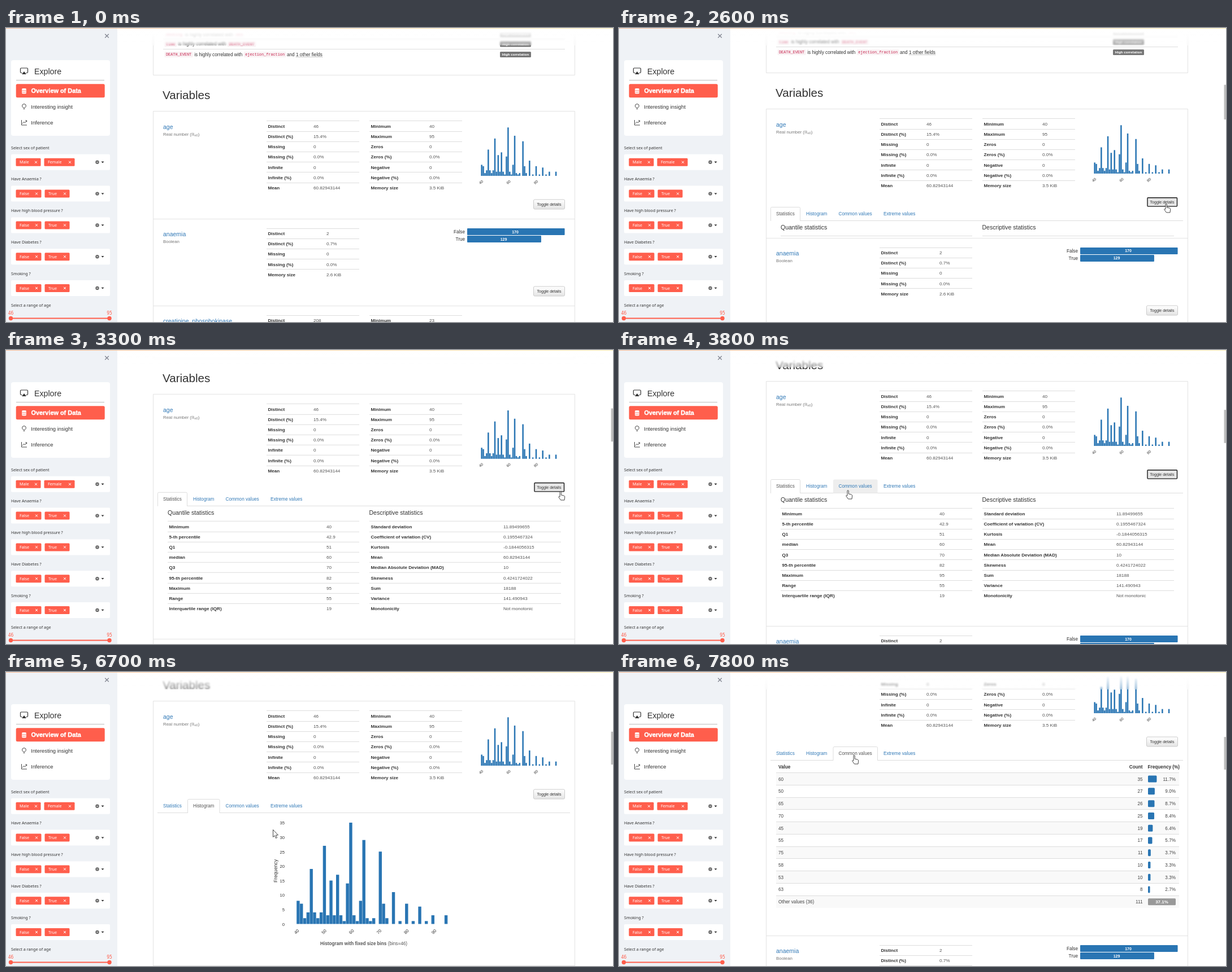
An HTML page that plays this animation: 1074 by 521 pixels, repeating every 8 s.

```html
<!DOCTYPE html>
<html lang="en">
<head>
<meta charset="utf-8">
<title>Data overview</title>
<style>
html, body { margin: 0; width: 100%; height: 100%; overflow: hidden; background: #fff; }
svg { position: absolute; left: 0; top: 0; font-family: "Liberation Sans", Arial, sans-serif; }
#header { position: absolute; left: 197px; top: 0; width: 877px; height: 31px;
  background: linear-gradient(#fff 20%, rgba(255,255,255,.5) 75%, rgba(255,255,255,.25));
  backdrop-filter: blur(1.6px); }
#stripe { position: absolute; left: 0; top: 0; width: 1074px; height: 1px;
  background: linear-gradient(90deg, #fbc09a, #fbeeb0); }
</style>
</head>
<body>
<svg id="main" width="1074" height="521"></svg>
<div id="header"></div>
<svg id="side" width="197" height="521"></svg>
<div id="stripe"></div>
<script>
const BLUE = '#2975b3', LINK = '#337ab7', RED = '#ff5e4c', INK = '#333', GRAY = '#777', EDGE = '#e3e3e3';
const SANS = 'font-family="Noto Sans, sans-serif"', MONO = 'font-family="Liberation Mono, monospace"';
const BOLD = 'font-weight="bold"', END = 'text-anchor="end"', MID = 'text-anchor="middle"';
const BOLD_END = `${BOLD} ${END}`, BOLD_MID = `${BOLD} ${MID}`;
const LOOP = 8000, STEP = 100, VIEW = 521;

// y is the vertical middle of the text
const text = (x, y, s, size = 8.2, fill = INK, more = '') =>
  `<text x="${x}" y="${y + size * .36}" font-size="${size}" fill="${fill}" ${more}>${s}</text>`;
const rect = (x, y, w, h, fill, more = '') =>
  `<rect x="${x}" y="${y}" width="${w}" height="${h}" fill="${fill}" ${more}/>`;
const path = (d, stroke, width = 1, fill = 'none', more = '') =>
  `<path d="${d}" stroke="${stroke}" stroke-width="${width}" fill="${fill}" ${more}/>`;
const hline = (x1, x2, y, color = '#ddd') => path(`M${x1} ${Math.floor(y) + .5}H${x2}`, color);
const group = (x, y, body, more = '') => `<g transform="translate(${x} ${y})" ${more}>${body}</g>`;
const tilted = (x, y, s, size, angle) =>
  text(x, y, s, size, INK, `${MID} transform="rotate(${angle} ${x} ${y})"`);
const list = (n, f) => Array.from({ length: n }, (_, i) => f(i)).join('');

// Smooth 0 to 1 between two times
function ramp(t, from, to) {
  const p = Math.min(1, Math.max(0, (t - from) / (to - from)));
  return p * p * (3 - 2 * p);
}

// Clicks that open the details and then each further tab
const CLICKS = [2600, 5700, 7600];
const PANEL = [243, 278, 318];

// Cursor moves: start, end, x, y
const MOVES = [[300, 1200, 934, 122], [1200, 1400, 963, 250], [1400, 2000, 964, 311],
  [2600, 3100, 977, 250], [3300, 3800, 401, 248], [3900, 4000, 350, 246], [4300, 4500, 342, 255],
  [4700, 5100, 334, 248], [6300, 6500, 412, 243], [6600, 6700, 472, 279], [6900, 7300, 412, 147]];
const cursorAt = t => MOVES.reduce(([x, y], [from, to, tx, ty]) => {
  const p = ramp(t, from, to);
  return [x + (tx - x) * p, y + (ty - y) * p];
}, [968, 114]);

// Round ages dominate; the ages between them thin out
const BINS = 46;
const PEAKS = { 40: 8, 42: 7, 45: 19, 50: 27, 53: 15, 55: 17, 58: 14, 60: 35, 63: 8, 65: 29,
  70: 25, 72: 7, 75: 11, 80: 7, 85: 6, 90: 3, 95: 3 };
const counts = Array.from({ length: BINS }, (_, i) =>
  Math.max(0, Math.round(3.4 - i * .09 + (i % 2 ? .8 : -.8))));
for (const age in PEAKS)
  counts[Math.min(BINS - 1, Math.floor((age - 40) / 55 * BINS))] = PEAKS[age];
const bars = (x, base, w, unit) =>
  list(BINS, i => rect(x + i * w, base - counts[i] * unit, w - .4, counts[i] * unit, BLUE));

function table(x, x2, y, valueX, rows) {
  return rows.split('|').map((r, i) => {
    const [label, value] = r.split(':'), cy = y + i * 18.22;
    return hline(x, x2, cy - 9) + text(x + 2.5, cy, label, 8.1, INK, BOLD) +
      text(valueX, cy, value, 8.1, '#555');
  }).join('');
}

const code = (x, y, s) => rect(x - 2.5, y - 5, s.length * 4.11 + 5, 10, '#f9f2f4', 'rx="1.5"') +
  text(x, y, s, 6.85, '#c7254e', MONO);

function alertRow(y, a, b) {
  const x = 288 + a.length * 4.11;
  return hline(278, 989, y - 9.5) + code(283, y, a) + text(x, y, 'is highly correlated with') +
    code(x + 90, y, b) + rect(874, y - 5, 55, 10, GRAY, 'rx="1.5"') +
    text(901.5, y, 'High correlation', 6.2, '#fff', BOLD_MID);
}

function button(y, focused, pressed) {
  const box = focused
    ? rect(935, y - 7.8, 52.5, 15.4, pressed ? '#d6d6d6' : '#e6e6e6', 'stroke="#1a1a1a" stroke-width="1.4" rx="1"')
    : rect(933.5, y - 8.5, 55, 17, 'url(#btn)', 'stroke="#ccc" rx="2"');
  return box + text(961, y, 'Toggle details', 7, INK, MID);
}

const ALERTS = path('M260.5 -20V83.5H1006.5V-20', EDGE) +
  alertRow(11, 'smoking', 'sex') + alertRow(28.5, 'time', 'DEATH_EVENT') +
  alertRow(47, 'DEATH_EVENT', 'ejection_fraction') + text(497, 47, 'and') +
  text(513, 47, '1 other fields') + path('M513 51.5H560', GRAY, .8, 'none', 'stroke-dasharray="1 1"');

const AGE = text(277, 118.5, 'Variables', 20.6) +
  path('M260.5 1000V147.5H1006.5V1000', EDGE) + text(278, 175.2, 'age', 10.5, LINK) +
  text(278, 188, 'Real number (<tspan font-family="DejaVu Sans, sans-serif" font-size="7">ℝ</tspan>' +
    '<tspan font-size="5.5" dy="1.5">≥0</tspan><tspan dy="-1.5">)</tspan>', 7.9, GRAY) +
  table(461, 625, 173.8, 544, 'Distinct:46|Distinct (%):15.4%|Missing:0|Missing (%):0.0%|Infinite:0|Infinite (%):0.0%|Mean:60.82943144') +
  table(643, 807, 173.8, 749, 'Minimum:40|Maximum:95|Zeros:0|Zeros (%):0.0%|Negative:0|Negative (%):0.0%|Memory size:3.5 KiB') +
  bars(840.4, 262, 2.92, 2.45) +
  list(3, i => tilted(840.5 + i * 48.5, 273, 40 + i * 20, 6.5, -45));

const boolBar = (y, label, n) => text(812, y, label, 8.2, INK, END) +
  rect(816, y - 6, n * 1.015, 12, BLUE, 'rx="1"') + text(816 + n / 2, y, n, 7, '#fff', BOLD_MID);

const LOWER = rect(261, 338, 745, 700, '#fff') + hline(260, 1007, 338, EDGE) +
  text(278, 365.5, 'anaemia', 10.5, LINK) + text(278, 378.5, 'Boolean', 7.9, GRAY) +
  table(461, 625, 364, 567, 'Distinct:2|Distinct (%):0.7%|Missing:0|Missing (%):0.0%|Memory size:2.6 KiB') +
  boolBar(361, 'False', 170) + boolBar(374, 'True', 129) +
  button(466.5) + hline(260, 1007, 492, EDGE) +
  text(278, 519.5, 'creatinine_phosphokinase', 10.5, LINK) +
  table(461, 625, 518, 544, 'Distinct:208|Distinct (%):69.6%') +
  table(643, 807, 518, 749, 'Minimum:23|Maximum:7861');

const STATS = text(286, 357, 'Quantile statistics', 10.5) + text(642.5, 357, 'Descriptive statistics', 10.5) +
  table(286, 625, 381.8, 567, 'Minimum:40|5-th percentile:42.9|Q1:51|median:60|Q3:70|95-th percentile:82|Maximum:95|Range:55|Interquartile range (IQR):19') +
  table(643, 982, 381.8, 880, 'Standard deviation:11.89499655|Coefficient of variation (CV):0.1955467324|Kurtosis:-0.1844056315|Mean:60.82943144|Median Absolute Deviation (MAD):10|Skewness:0.4241724022|Sum:18188|Variance:141.490943|Monotonicity:Not monotonic');

const HISTOGRAM = bars(514.2, 542.5, 5.815, 5.13) +
  list(8, i => text(493, 543 - i * 25.65, i * 5, 7.7, INK, END)) +
  list(6, i => tilted(514 + i * 48.6, 556, 40 + i * 10, 7.7, -45)) +
  tilted(476.5, 448.5, 'Frequency', 8.7, -90) +
  text(556, 577, 'Histogram with fixed size bins <tspan font-weight="normal">(bins=46)</tspan>', 8.2, '#555', BOLD);

function valueRow(row, i) {
  const [value, count] = row.split(':'), y = 378.6 + i * 21.77, pct = count / 2.99;
  const label = pct.toFixed(1) + '%', other = value.startsWith('Other');
  return (i % 2 ? '' : rect(278, y - 11, 713, 21.8, '#f9f9f9')) + hline(278, 991, y - 11) +
    text(282, y, value, 8.2, '#444') + text(926.5, y, count, 8.2, '#444', END) +
    rect(936, y - 6, pct * 1.32, 12, other ? '#999' : BLUE, 'rx="1.5"') +
    (other ? text(960.5, y, label, 8, '#fff', BOLD_MID) : text(985, y, label, 8.2, '#444', END));
}

const COMMON = text(282, 357, 'Value', 8.2, INK, BOLD) + text(926.5, 357, 'Count', 8.2, INK, BOLD_END) +
  text(992, 357, 'Frequency (%)', 8.2, INK, BOLD_END) +
  '60:35|50:27|65:26|70:25|45:19|55:17|75:11|58:10|53:10|63:8|Other values (36):111'
    .split('|').map(valueRow).join('');

const CONTENT = [STATS, HISTOGRAM, COMMON];
const TABS = ['Statistics', 'Histogram', 'Common values', 'Extreme values'];
const TAB_X = [268.5, 321.5, 379, 458.5, 535];

function tabBar(active, hover) {
  return hline(268, 998, 345) + TABS.map((name, i) => {
    const a = TAB_X[i], b = TAB_X[i + 1] - 1;
    const shape = `M${a} 345.5V323.5q0-2 2-2H${b - 2}q2 0 2 2V345.5`;
    const back = i === active ? path(shape, '#ddd', 1, '#fff') + rect(a + .5, 345, b - a - 1, 1.2, '#fff')
      : i === hover ? path(shape, 'none', 0, '#eee') : '';
    return back + text(a + 9.5, 333.4, name, 8.2, i === active ? '#555' : LINK);
  }).join('');
}

const HAND = 'M3 1.2q1.3-1 2.3.2V7l5 1.2q1.5.6 1.4 2L11 16H4.5L.6 10.4q.4-1.6 2.4-.2z';
const ARROW = 'M.5 .5V13.5L3.4 10.9 5.4 15.6 7.6 14.6 5.5 10H9.5z';
const DEFS = '<defs><linearGradient id="btn" x2="0" y2="1"><stop stop-color="#fff"/>' +
  '<stop offset="1" stop-color="#e4e4e4"/></linearGradient></defs>';

function render(t) {
  const clicks = CLICKS.filter(c => t >= c).length, active = Math.max(0, clicks - 1);
  const open = PANEL[active] * ramp(t, 2500, 2900);
  const scroll = 4 * clicks + 88 * ramp(t, 3100, 3400) + 89 * ramp(t, 6900, 7300);
  const [x, y] = cursorAt(t), tipX = x + 4, tipY = y + scroll;
  const onTabs = clicks && tipY > 321 && tipY < 345.5;
  const hover = onTabs ? TABS.findIndex((_, i) => tipX > TAB_X[i] && tipX < TAB_X[i + 1]) : -1;
  const onButton = tipX > 933 && tipX < 989 && tipY > 303 && tipY < 321;
  const fade = active && t === CLICKS[active] ? .5 : 1;
  const details = open ? tabBar(active, hover) + group(0, 0, CONTENT[active], `opacity="${fade}"`) : '';
  const page = ALERTS + AGE + button(312.5, t >= 200 && t < 5000, t >= 2400 && t < 2600) +
    details + group(0, open, LOWER);
  const ratio = VIEW / (4378 + open);
  const overlay = rect(1070.5, (849 + scroll) * ratio, 3.5, VIEW * ratio, '#bdbdbd') +
    group(x, y, path(hover >= 0 || onButton ? HAND : ARROW, INK, .9, '#fff'));
  main.innerHTML = DEFS + group(0, -scroll, page) + (t < 200 ? '' : overlay);
}

function sidebar() {
  const cross = (x, y, r, color, w) =>
    path(`M${x - r} ${y - r}l${2 * r} ${2 * r}m0 ${-2 * r}l${-2 * r} ${2 * r}`, color, w);
  const tag = (x, w, y, s) => rect(x, y - 7, w, 14, RED, 'rx="1.5"') +
    text(x + 6.5, y, s, 7.2, '#fff', SANS) + cross(x + w - 8.5, y, 2, '#fff', 1);
  const tags = (y, a, wa, b, wb) => tag(17.5, wa, y, a) + tag(23.5 + wa, wb, y, b);
  const field = (s, i) => {
    const y = 212 + i * 55.8, by = y + 25.8;
    return text(9, y, s, 7.2, INK, SANS) + rect(9, by - 14, 175, 28, '#fff', 'rx="2"') +
      (i ? tags(by, 'False', 45, 'True', 44) : tags(by, 'Male', 44, 'Female', 54)) +
      `<circle cx="161.5" cy="${by}" r="3.2" fill="#666"/>` + cross(161.5, by, 1.1, '#fff', .8) +
      path(`M168.5 ${by - 1.2}h5l-2.5 2.8z`, 'none', 0, INK);
  };
  const fields = ['Select sex of patient', 'Have Anaemia ?', 'Have high blood pressure ?',
    'Have Diabetes ?', 'Smoking ?'].map(field).join('');
  const menu = rect(9, 57, 175, 134, '#fff', 'rx="4"') +
    path('M28.5 79.5H27q-1.5 0-1.5-1.5V72.5q0-1.5 1.5-1.5H37q1.5 0 1.5 1.5V78q0 1.5-1.5 1.5H35.5', INK, 1.2) +
    path('M32 77l4 5h-8z', 'none', 0, INK) +
    text(50, 76.5, 'Explore', 14.2) + hline(18, 174, 92, '#bbb') +
    rect(17.7, 99.3, 157, 24, RED, 'rx="2.5"') + rect(28, 107, 8, 9.5, '#fff', 'rx="2"') +
    path('M28 110.2q4 1.6 8 0M28 113.3q4 1.6 8 0', RED, .8) +
    text(44.5, 111.3, 'Overview of Data', 10.9, '#fff', `${BOLD} stroke="#fff" stroke-width=".4"`) +
    path('M30.6 141.5Q28.5 139.5 28.6 138a3.4 3.4 0 0 1 6.8 0Q35.5 139.5 33.4 141.5zM30.7 143.5h2.6', INK, .9) +
    text(44.3, 139.3, 'Interesting insight', 9.4) +
    path('M27.5 163V172H37M29 169.5l2.5-3 2 1.5 3-3.7M34.3 164h2.4v2.4', INK, .9) +
    text(44.3, 167.3, 'Inference', 9.4);
  const thumb = (x, value) => `<circle cx="${x}" cy="514.5" r="3.7" fill="${RED}"/>` +
    text(x, 505, value, 8, RED, `${MID} font-family="DejaVu Sans Mono, monospace"`);
  return rect(0, 0, 197, VIEW, '#eff2f6') + cross(178.5, 14, 3.3, '#808490', 1.3) + menu + fields +
    text(9, 491, 'Select a range of age', 7.2, INK, SANS) +
    rect(9, 513.5, 175, 2, RED) + thumb(8.5, 46) + thumb(183, 95);
}

const main = document.getElementById('main');
document.getElementById('side').innerHTML = sidebar();
let shown = -1;
function tick() {
  const t = Math.floor(performance.now() % LOOP / STEP) * STEP;
  if (t !== shown) render(shown = t);
  requestAnimationFrame(tick);
}
tick();
</script>
</body>
</html>
```
